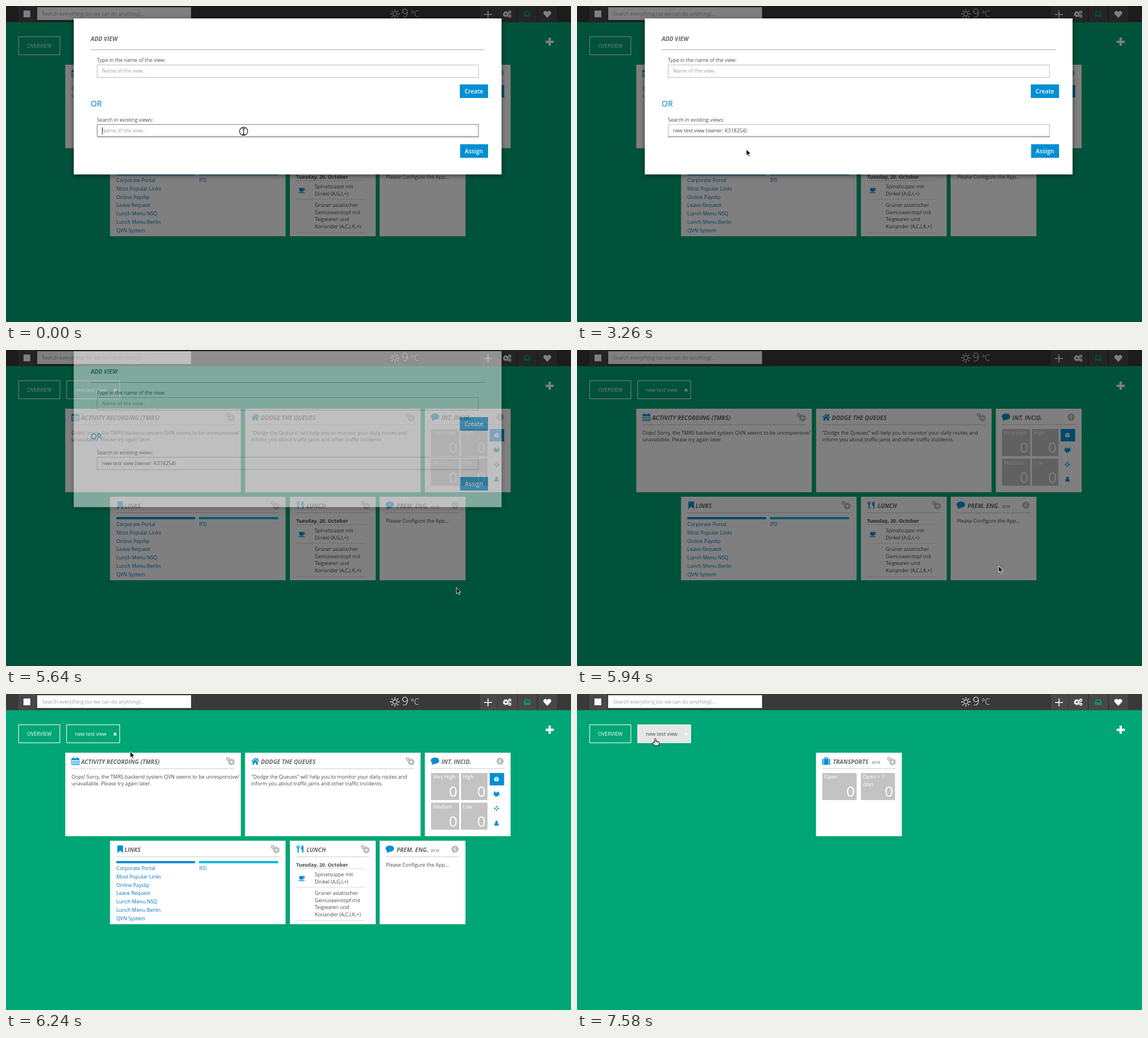
Recreate the animation shown at these times as an HTML page. Size 1001 by 560 pixels, loop 8000 ms.

```html
<!DOCTYPE html>
<html lang="en">
<head>
<meta charset="utf-8">
<title>Add view</title>
<style>
html, body { margin: 0; width: 100%; height: 100%; overflow: hidden; background: #00a675 }
svg { display: block; font: 8.93px "Open Sans", sans-serif }
text { fill: #4a4a4a; white-space: pre }
.white { fill: #fff }
.hint { fill: #a0a0a0 }
.link { fill: #0076bd }
.title { font: italic 700 10.4px "Open Sans", sans-serif; fill: #666 }
.beta { font: italic 7px "Open Sans", sans-serif; fill: #777 }
.bold { font-weight: 700 }
.count { font-size: 26px; fill: #fff; text-anchor: end }
.mid { text-anchor: middle }
.button { font-size: 10.4px; font-weight: 600; fill: #fff; text-anchor: middle }
.item { font-size: 10.3px; fill: #fff }
.big { font-size: 21px; font-weight: 300; fill: #fff }
.unit { font-size: 14px; font-weight: 300; fill: #fff }
.or { font-size: 14.2px; fill: #007dc0 }
</style>
</head>
<body>
<svg id="stage" width="1001" height="560" viewBox="0 0 1001 560"></svg>
<script>
const BLUE = '#008fd3', GREEN = '#00a675', GREY = '#c3c3c3';

const text = (x, y, s, cls = '') => `<text x="${x}" y="${y}" class="${cls}">${s}</text>`;
const rect = (x, y, w, h, fill, more = '') =>
  `<rect x="${x}" y="${y}" width="${w}" height="${h}" fill="${fill}" ${more}/>`;
const frame = (x, y, w, h, color, fill = 'none', more = '') =>
  rect(x + .5, y + .5, w - 1, h - 1, fill, `stroke="${color}" ${more}`);
const fillPath = (d, color) => `<path d="${d}" fill="${color}"/>`;
const line = (d, color, width = 1) => `<path d="${d}" fill="none" stroke="${color}" stroke-width="${width}"/>`;
const dot = (x, y, r, color) => `<circle cx="${x}" cy="${y}" r="${r}" fill="${color}"/>`;
const at = (x, y, s) => `<g transform="translate(${x} ${y})">${s}</g>`;
const group = (id, s, more = '') => `<g id="${id}" ${more}>${s}</g>`;

const ring = (x, y, r, color, width, more = '') =>
  `<circle cx="${x}" cy="${y}" r="${r}" fill="none" stroke="${color}" stroke-width="${width}" ${more}/>`;
const gear = (x, y, r, color) => ring(x, y, r * .6, color, r * .5) +
  ring(x, y, r * .9, color, r * .35, 'pathLength="16" stroke-dasharray="1"');

const person = (x, y, r, color) => dot(x, y - r, r, color) +
  fillPath(`M${x - r * 1.6} ${y + r * 1.8}v${-r}q0 ${-r} ${r * 1.6} ${-r}t${r * 1.6} ${r}v${r}z`, color);

const icons = {
  calendar: frame(-7, -5, 14, 12, BLUE) + rect(-7, -5, 14, 3, BLUE) +
    line('M-6.5 1H6.5M-6.5 4H6.5M-3-2V6.5M0-2V6.5M3-2V6.5', BLUE, .8) + line('M-3.5-7V-3M3.5-7V-3', BLUE, 2),
  home: fillPath('M-7 0L0-6 3-3.5V-5.5H5V-2L7 0 6 1 0-4-6 1ZM-4.8 1.2L0-2.8 4.8 1.2V6H1.3V2.5H-1.3V6H-4.8Z', BLUE),
  chat: `<ellipse cy="-1" rx="7.5" ry="5.6" fill="${BLUE}"/>` + fillPath('M-5 2Q-4 5-6.5 6.5-2 6.5 0 4Z', BLUE),
  bookmark: fillPath('M-5-6.5H5V7L0 2.5-5 7Z', BLUE),
  cutlery: line('M-5.5-6.5V-2M-3.5-6.5V-2M-1.5-6.5V-2M-5.5-2H-1.5', BLUE, 1.2) + line('M-3.5-2V6', BLUE, 2) +
    fillPath('M2-3Q2-6.5 6-6.5V6H4V1H2Z', BLUE),
  suitcase: rect(-7, -4, 2, 10.5, BLUE) + rect(-4, -4, 8, 10.5, BLUE) + rect(5, -4, 2, 10.5, BLUE) +
    line('M-2.5-4V-6H2.5V-4', BLUE, 1.3),
  coffee: fillPath('M-4-3.5H4V0Q4 3 1 3H-1Q-4 3-4 0ZM-6 4H6Q5 5.5 3 5.5H-3Q-5 5.5-6 4Z', BLUE) + ring(4, -1, 2, BLUE, 1),
  gears: gear(2, 1.5, 6, '#bbb') + gear(-4.5, -4, 3.4, '#bbb'),
  back: dot(0, 0, 6.3, '#bbb') + line('M1.5-3.3L-1.8 0 1.5 3.3', '#fff', 1.6),
};

function card(x, y, w, icon, title, menu, body, titleX = x + 28) {
  return rect(x, y, w, 148, '#fff') + at(x + 18, y + 15, icons[icon]) + text(titleX, y + 20, title, 'title') +
    at(x + w - 18.5, y + 15, icons[menu]) + line(`M${x + 11} ${y + 28.5}H${x + w - 11}`, '#ccc') + body;
}
const lines = (x, y, step, rows, cls) => rows.map((s, i) => text(x, y + i * step, s, cls)).join('');
const counter = (x, y, w, label) => rect(x, y, w, 48, GREY) + lines(x + 3.5, y + 10, 12.8, label.split('|'), 'white') +
  text(x + w - 3.5, y + 42, 0, 'count');

const header = rect(0, 0, 1001, 28.5, '#393939') + rect(22, 0, 31, 28.5, '#484848') + rect(31, 8, 12, 12, '#fff') +
  frame(55, 2, 273, 23, '#ddd', '#fff') + text(64, 17, 'Search everything (so we can do anything)...', 'hint') +
  ring(689, 14, 3.8, '#fff', 1.2) + ring(689, 14, 7, '#fff', 2.2, 'pathLength="16" stroke-dasharray=".6 1.4" stroke-dashoffset=".3"') +
  text(701, 20, '9', 'big') + text(717, 19, '°C', 'unit') +
  [[840, 30], [871, 34], [907, 33], [943, 33]].map(([x, w]) => rect(x, 0, w, 28.5, '#484848')).join('') +
  line('M847 15H861M854 8V22', '#fff', 1.6) +
  gear(885.5, 14.5, 5, '#fff') + gear(892.5, 11, 2.9, '#fff') + gear(892.5, 18, 2.9, '#fff') +
  line('M918.5 14.5L920 10.5H927L928.5 14.5V18.5H918.5ZM918.5 15.5H921.5L922.5 17H924.5L925.5 15.5H928.5', GREEN, 1.7) +
  fillPath('M959 21L952.8 14.5C950 10.5 955.5 6.5 959 10.5 962.5 6.5 968 10.5 965.2 14.5Z', '#fff');

const tabs = frame(22, 54, 74, 33, '#fff') + text(59, 74, 'OVERVIEW', 'white mid') +
  group('tab', frame(107, 54, 95, 33, '#fff', 'none', 'id="tabBox"') +
    `<text id="tabName" x="122" y="74">new test view</text>` + line('M191 69L195.4 73.4M195.4 69L191 73.4', '#fff', 1.8)) +
  line('M956 63.5H970.5M963.2 56V70.5', '#fff', 4);

const overview =
  card(105, 104, 311, 'calendar', 'ACTIVITY RECORDING (TMR5)', 'gears', lines(116, 149.5, 12.6,
    ['Oops! Sorry, the TMR5 backend system QVN seems to be unresponsive/', 'unavailable. Please try again later.'])) +
  card(423.5, 104, 311, 'home', 'DODGE THE QUEUES', 'gears', lines(434.5, 149.5, 12.6,
    ['"Dodge the Queues" will help you to monitor your daily routes and', 'inform you about traffic jams and other traffic incidents.'])) +
  card(742, 104, 152, 'chat', 'INT. INCID.', 'back',
    counter(753, 140, 50, 'Very High') + counter(806, 140, 47, 'High') +
    counter(753, 192.5, 50, 'Medium') + counter(806, 192.5, 47, 'Low') + rect(857, 140, 25.5, 22, BLUE) +
    fillPath('M869 146.5L873 148.5V153.5L869 155.5 865 153.5V148.5Z', '#fff') + line('M865 148.7L869 150.7 873 148.7M869 150.7V155.5', BLUE, .8) +
    person(866, 176, 1.6, BLUE) + person(872, 176, 1.6, BLUE) + person(869, 178, 1.9, BLUE) +
    [[0, -3], [3, 0], [0, 3], [-3, 0]].map(([x, y]) => fillPath(`M${869 + x} ${201 + y}l1.7 1.7-1.7 1.7-1.7-1.7z`, BLUE)).join('') +
    person(869, 229, 2.3, BLUE), 771.5) +
  card(184.3, 260, 311, 'bookmark', 'LINKS', 'gears',
    rect(195.5, 296, 139.5, 4, BLUE) + rect(342, 296, 140, 4, '#00b9e0') +
    lines(195.5, 312, 14.8, ['Corporate Portal', 'Most Popular Links', 'Online Payslip', 'Leave Request',
      'Lunch Menu NSQ', 'Lunch Menu Berlin', 'QVN System'], 'link') + text(342, 312, 'IFD', 'link'), 210) +
  card(503, 260, 152, 'cutlery', 'LUNCH', 'gears',
    text(514, 305.5, 'Tuesday, 20. October', 'bold') + line('M514 309.5H636M514 342.5H636M514 401.5H636', '#ddd') +
    at(523.5, 326, icons.coffee) + lines(547, 323, 12.5, ['Spinatsuppe mit', 'Dinkel (A,G,I,+)']) +
    lines(547, 356, 12.6, ['Grüner asiatischer', 'Gemüseeintopf mit', 'Teigwaren und', 'Koriander (A,C,I,K,+)']), 532.5) +
  card(662, 260, 152, 'chat', 'PREM. ENG.', 'back',
    text(753, 280, 'BETA', 'beta') + text(673, 305.5, 'Please Configure the App...'), 692);

const transports = card(423.5, 104, 152, 'suitcase', 'TRANSPORTS', 'gears',
  text(522.5, 124, 'BETA', 'beta') + counter(434.5, 140, 61, 'Open') + counter(503, 140, 60.5, 'Open &gt; 7|days'), 453.5);

const owner = '(owner: K318254)';
const modal = rect(120, 22, 758, 276.5, '#fff', 'style="filter:drop-shadow(0 2px 4px #0008)"') +
  text(150, 62, 'ADD VIEW', 'title') + line('M150 77.5H848', '#aaa') +
  text(161, 99, 'Type in the name of the view:') + frame(161, 104, 676.5, 23, '#bbb') + text(170, 118.3, 'Name of the view..', 'hint') +
  rect(804, 139, 50, 24, BLUE) + text(829, 155, 'Create', 'button') + text(150, 178, 'OR', 'or') +
  text(161, 205, 'Search in existing views:') + frame(161, 209.5, 676.5, 23, '#bbb', 'none', 'id="field"') +
  rect(161, 230.5, 677, 2, '#aaa', 'id="underline"') + `<text id="query" x="170" y="224.3"></text>` +
  rect(170, 215, 1, 13, '#333', 'id="caret"') +
  rect(804.5, 245, 49.5, 24, BLUE, 'id="assign"') + text(829, 261, 'Assign', 'button') +
  group('menu', rect(161, 234, 186, 28.5, '#fff', 'style="filter:drop-shadow(0 1px 2px #0007)"') +
    rect(161.5, 238.5, 185, 19.5, BLUE) + text(176, 252, `new <tspan class="bold">test</tspan> view ${owner}`, 'item'));

const pointer = group('ring', ring(0, 0, 7.2, '#fff8', 2.6) + ring(0, 0, 7.2, '#111', 1.2)) +
  group('beam', line('M-2.5-5Q0-5 0-4 0-5 2.5-5M0-4V5M-2.5 6Q0 6 0 5 0 6 2.5 6', '#000', 1.2)) +
  group('arrow', '<path d="M0 0V11L2.5 8.7 4.4 12.6 6.2 11.8 4.4 8H8Z" fill="#000" stroke="#fff" stroke-width=".9"/>') +
  group('hand', '<path d="M-1.2 1Q0-1 1.2 1V4.8L6 6Q7.4 6.5 7.1 8L6 13H-.5L-4.4 8.4Q-4.8 6.6-3 6.9L-1.2 8.2Z" fill="#fff" stroke="#000"/>' +
    line('M1.2 5V8M3.2 6V8M5.1 6.3V8', '#000', .7));

const $ = id => document.getElementById(id);
$('stage').innerHTML = rect(0, 0, 1001, 560, GREEN) + header + tabs + group('overview', overview) +
  group('transports', transports) + rect(0, 0, 1001, 560, '#000', 'id="shade"') + group('modal', modal) + group('pointer', pointer);

// Pointer stops: tick, x, y, shape from here on
const path = [
  [0, 421, 222, 'beam'], [14, 421, 222, 'beam'], [15, 413, 226, 'beam'], [16, 385, 236, 'arrow'], [18, 312, 251, 'hand'],
  [21, 300, 254, 'arrow'], [22, 300, 254, 'arrow'], [25, 520, 284, 'arrow'], [27, 740, 284, 'arrow'], [29, 820, 267, 'hand'],
  [33, 820, 267, 'hand'], [34, 815, 302, 'arrow'], [36, 798, 421, 'arrow'], [38, 798, 421, 'arrow'], [40, 747, 383, 'arrow'],
  [41, 322, 148, 'arrow'], [42, 220, 102, 'arrow'], [43, 165, 80, 'hand'], [46, 142.5, 76.5, 'hand'], [50, 142.5, 76.5, 'hand'],
  [51, 138.5, 78.5, 'hand'], [60, 138.5, 78.5, 'hand']];
const clicks = [0, 20, 30, 48];

const show = (id, on) => $(id).style.display = on ? '' : 'none';
const set = (id, name, value) => $(id).setAttribute(name, value);

function draw(ms) {
  const n = Math.floor((ms + 14) / 148.6);   // the screen refreshes in coarse ticks

  const i = path.findIndex((p, k) => n < path[k + 1][0]);
  const [n0, x0, y0, shape] = path[i], [n1, x1, y1] = path[i + 1], k = (n - n0) / (n1 - n0);
  set('pointer', 'transform', `translate(${x0 + (x1 - x0) * k} ${y0 + (y1 - y0) * k})`);
  for (const id of ['beam', 'arrow', 'hand']) show(id, id === shape);
  show('ring', clicks.includes(n));

  const typed = n < 6 ? 0 : n < 10 ? Math.min(n - 5, 3) : 4;
  $('query').textContent = n >= 21 ? `new test view ${owner}` : 'test'.slice(0, typed) || 'Name of the view..';
  set('query', 'class', typed ? '' : 'hint');
  show('caret', n < 4);
  show('menu', n >= 12 && n < 21);
  set('field', 'stroke', n < 16 ? '#777' : '#bbb');
  set('underline', 'width', n < 30 ? 677 : n < 31 ? 257 : 0);
  set('assign', 'fill', n >= 29 && n < 34 ? '#0076bd' : BLUE);

  show('modal', n < 39);
  set('modal', 'opacity', n < 38 ? 1 : .5);
  set('modal', 'transform', `translate(0 ${n < 38 ? 0 : -20})`);
  set('shade', 'opacity', n < 41 ? .5 : n < 42 ? .11 : 0);

  const hover = n >= 43;
  show('tab', n >= 31);
  set('tabBox', 'fill', hover ? '#e6e6e6' : 'none');
  set('tabName', 'class', hover ? '' : 'white');
  show('overview', n < 49);
  show('transports', n >= 49);
}

const start = performance.now();
function loop() {
  draw((performance.now() - start) % 8000);
  requestAnimationFrame(loop);
}
loop();
</script>
</body>
</html>
```
